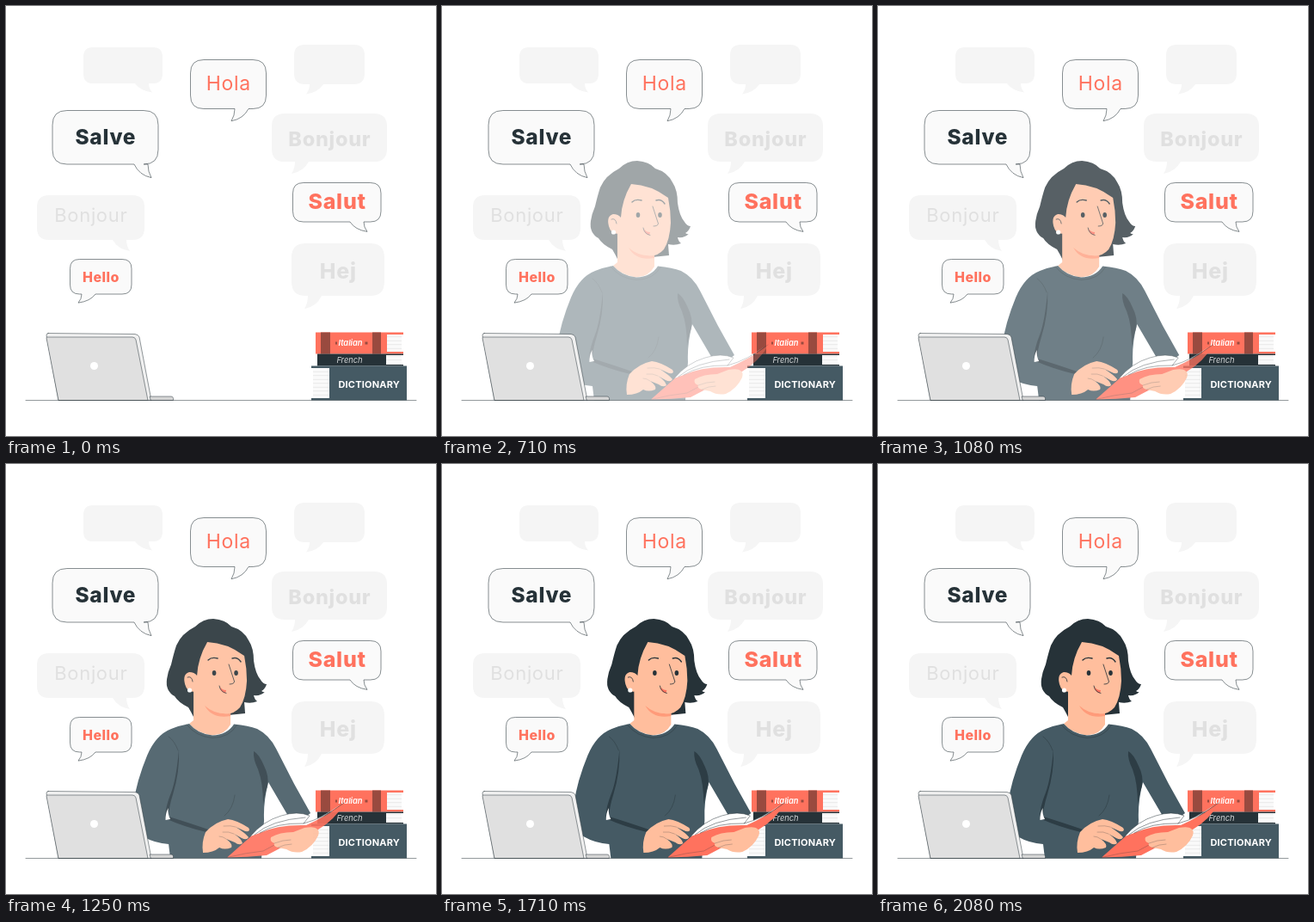
Animation of 500x500 px, one loop 2120 ms. Source, as an HTML page:

```html
<!DOCTYPE html>
<html lang="en">
<head>
<meta charset="utf-8">
<title>Languages</title>
<style>
html, body { margin: 0; width: 100%; height: 100%; overflow: hidden; background: #fff; }
svg { display: block; width: 100vw; height: 100vh; }
text { font-family: Inter, "Open Sans", sans-serif; text-anchor: middle; }
.ink { fill: none; stroke: #263238; stroke-width: .8; stroke-linecap: round; stroke-linejoin: round; }
.thin { stroke-width: .5; }
.bold { stroke-width: 1.4; }
.faint { opacity: .5; }
.skin { fill: #ffbe9d; }
.fold { fill: #2d3d45; }
.sweater { fill: #455a64; }
.hair { fill: #263238; }
.coral { fill: #ff725e; }
.band { fill: #994a3f; }
.pages { fill: url(#sheets); }
</style>
</head>
<body>
<svg viewBox="0 0 500 500">
  <defs>
    <pattern id="sheets" width="30" height="4.500" patternUnits="userSpaceOnUse">
      <path fill="#fafafa" d="M0 0H30V4.500H0Z"/>
      <path fill="#dedede" d="M0 2H30V2.600H0Z"/>
    </pattern>
  </defs>

  <g id="bubbles"></g>

  <g id="books">
    <path class="pages" d="M443 381H460V403H443ZM442 405H460V418H442ZM357 420H376V457H357Z"/>
    <path class="coral" d="M360 379.500H462V382H443V402H462V404.500H360Z"/>
    <path class="band" d="M366 379.500H377V404.500H366ZM426 379.500H436V404.500H426ZM383 390.500h2v3h-2zM417.500 390.500h3v3h-3z"/>
    <path class="hair" d="M362 404.500H462V406H442V417H462V418.500H362Z"/>
    <path class="sweater" d="M355 418.500H466V458.500H355V456H376V421H355Z"/>
    <g fill="#fff">
      <text x="400.500" y="395" font-size="9.300" font-weight="600" font-style="italic">Italian</text>
      <text x="399.500" y="415" font-size="9.300" font-style="italic" opacity=".8">French</text>
      <text x="422.200" y="444" font-size="11" font-weight="700" letter-spacing=".2">DICTIONARY</text>
    </g>
  </g>

  <g id="woman">
    <path class="hair" d="M223 189Q232 180 244 180Q258 181 265 189Q279 193 285 205Q291 214 291 229Q293 244 299 251Q302 256 306 256Q304 262 300 264Q303 266 304 265Q299 270 291 269Q292 274 295 276Q288 279 280 277L281 290L222 296Q218 288 215 283Q203 277 199 270Q188 264 190 250Q191 242 195 233Q198 220 201 211Q207 197 223 189Z"/>
    <path class="skin" d="M221 258H264V303Q256 317 240 315Q224 312 216 302L221 298Z"/>
    <path fill="#ff9b7a" d="M234 281Q246 292 264 290V293Q243 297 234 281Z"/>
    <path class="skin" d="M237 207Q260 208 280 223Q283 238 283 252Q282 272 275 283Q267 292 256 290Q238 287 230 274L224 264Q214 267 211 256Q208 244 216 242Q222 242 225 246Q226 226 237 207Z"/>
    <circle cx="216.500" cy="263" r="2.600" fill="#fff"/>
    <g class="hair">
      <ellipse cx="245" cy="243" rx="2.300" ry="2.900"/>
      <ellipse cx="270.500" cy="243" rx="2.300" ry="2.900"/>
    </g>
    <path class="ink bold" d="M238 228Q242 224 249 226M266 226Q272 224 276 230"/>
    <path class="ink" d="M214 248Q219 246 220 253M262 233L268.500 253Q268 256 263 256"/>
    <path class="coral" d="M252 259Q252 265 258 266.500L259 263Q254 263 252 259Z"/>
    <path class="ink" d="M251 258Q252 265 259 266.500"/>

    <path class="sweater" d="M216 302Q226 314 243 315.500Q260 315 268 302.500Q285 304 295 308Q309 315 317 331L338 372L357 406Q344 417 332 411L308 370Q302 393 303 414L300 458.500H194L192 442Q176 441 162 433Q148 420 151 395Q155 368 167 339Q177 315 195 308Q205 304 216 302Z"/>
    <path class="fold" d="M204 332Q205 358 197 384Q192 400 192 410Q212 416 238 425L236 428Q210 422 188 412Q188 399 195 382Q201 366 204 332Z"/>
    <path fill="#fff" d="M191.500 400Q188 407 188.500 414L194 413Q191 408 191.500 400Z"/>
    <path class="fold" d="M291 334Q297 337 303 351Q309 363 307 374Q303 388 302 396Q302 371 296 355Q290 343 291 334Z"/>
    <path class="ink faint" d="M213 303Q224 317 243 318.500Q263 318 271 304M192 317Q199 322 203 333M269 385Q267 401 257 409"/>

    <path class="coral" d="M260 457.500L290 431Q325 416 352 418Q375 411 397 394Q385 414 366 425Q342 436 306 455Q284 457 260 457.500Z"/>
    <path fill="#fff" d="M287 433Q302 415 323 409Q342 403 356 409L349 418Q368 413 392 396Q373 411 352 420Q319 419 298 429Z"/>
    <path class="ink thin" d="M287 433Q302 415 323 409Q342 403 356 409L349 418Q317 417 298 429M292 431Q311 414 351 411M349 418Q372 412 396 394"/>
    <path class="ink thin faint" d="M260 457.500Q282 452 302 450Q334 432 360 424"/>

    <path class="skin" d="M311 434Q321 428 337 428L350 423Q361 421 364 424Q368 426 366 432Q360 445 347 451Q337 453 329 448L319 446Q313 444 315 441Q309 439 311 434Z"/>
    <path class="skin" d="M235 428Q246 416 261 413Q271 414 285 423Q288 428 281 427L270 422Q281 429 285 434Q283 438 277 435L268 430Q277 436 278 441Q274 444 269 440L259 436Q267 442 265 446Q257 449 251 446Q244 452 232 452Q230 440 235 428Z"/>
    <path class="ink thin faint" d="M315 441Q325 437 334 437M319 446Q327 442 335 442M256 421Q264 420 270 422M255 428Q262 427 268 430M251 433Q255 433 259 436"/>
  </g>

  <g id="laptop" class="ink thin">
    <path fill="#f0f0f0" d="M49 380.500L150 381.500Q154 382 155 385L169 458.500H61L47 383Q47 381 49 380.500Z"/>
    <path fill="#e0e0e0" d="M48 385H147Q150 385 151 388L165 458.500H61L47 386Z"/>
    <path fill="#d5d5d5" d="M167.500 454H192Q195 454 194.500 458.500H168.500Z"/>
    <circle cx="102.500" cy="418.500" r="4.500" fill="#fff" stroke="none"/>
  </g>
  <path class="ink thin" d="M23 458.500H477"/>
</svg>

<script>
const CORAL = '#ff725e', DARK = '#263238', PALE = '#e0e0e0';

// Box, tail tip and lean (-1 left, 1 right); pale bubbles have no outline
const bubbles = [
  { box: [90, 48, 92, 42], tip: 170, lean: 1 },
  { box: [335, 45, 82, 46], tip: 349, lean: -1 },
  { box: [309, 125, 134, 56], tip: 332, lean: -1, text: 'Bonjour', base: 163, size: 23.5, weight: 800 },
  { box: [36, 220, 125, 52], tip: 144, lean: 1, text: 'Bonjour', base: 250.5, size: 22, weight: 400 },
  { box: [332, 276, 108, 61], tip: 347, lean: -1, text: 'Hej', base: 317, size: 25, weight: 800 },
  { box: [214.5, 62.5, 88, 57], tip: 262, lean: -1, text: 'Hola', base: 98, size: 23, weight: 400, color: CORAL },
  { box: [54, 121.5, 123, 62.5], tip: 169, lean: 1, text: 'Salve', base: 161, size: 24.5, weight: 800, color: DARK },
  { box: [333.5, 205.5, 102.5, 45.5], tip: 420, lean: 1, text: 'Salut', base: 236, size: 25, weight: 800, color: CORAL },
  { box: [74.5, 294.5, 71.5, 40.5], tip: 84, lean: -1, text: 'Hello', base: 321, size: 16, weight: 800, color: CORAL }
];

function add(parent, tag, attrs, text = '') {
  const el = document.createElementNS('http://www.w3.org/2000/svg', tag);
  for (const name in attrs) el.setAttribute(name, attrs[name]);
  el.textContent = text;
  parent.append(el);
}

function bubblePath([x, y, w, h], tip, lean) {
  const c = h * .27, r = x + w, b = y + h, drop = h * .25;
  const near = tip - lean * 4, far = tip - lean * 20;
  const nearSide = `${near} ${b + drop * .55}`;
  const farSide = `${far + lean * 6} ${b + drop * .82}`;
  const end = `${tip} ${b + drop}`;
  const tail = lean > 0
    ? `H${near}Q${nearSide} ${end}Q${farSide} ${far} ${b}`
    : `H${far}Q${farSide} ${end}Q${nearSide} ${near} ${b}`;
  return `M${x + c} ${y}H${r - c}Q${r} ${y} ${r} ${y + c}V${b - c}Q${r} ${b} ${r - c} ${b}` +
    `${tail}H${x + c}Q${x} ${b} ${x} ${b - c}V${y + c}Q${x} ${y} ${x + c} ${y}Z`;
}

const layer = document.getElementById('bubbles');
for (const { box, tip, lean, text, base, size, weight, color } of bubbles) {
  add(layer, 'path', {
    d: bubblePath(box, tip, lean), fill: color ? '#fafafa' : '#f5f5f5',
    stroke: color ? DARK : 'none', 'stroke-width': .55
  });
  if (!text) continue;
  const gap = size * .03;
  add(layer, 'text', {
    x: box[0] + (box[2] + gap) / 2, y: base, fill: color || PALE,
    'font-size': size, 'font-weight': weight, 'letter-spacing': gap
  }, text);
}

const LOOP = 2120, STEPS = 51, WAIT = 4, SLIDE = 46, SHIFT = 30;

// Gentle start, slight overshoot, then settles at 1
function ease(u) {
  return u + .35 * Math.sin(Math.PI * u ** 1.55);
}

const woman = document.getElementById('woman');
const start = performance.now();

function draw(now) {
  const time = Math.max(0, now - start) % LOOP;
  const step = Math.floor(time / LOOP * STEPS + .05);
  const p = ease(Math.min(1, Math.max(0, (step - WAIT) / SLIDE)));
  woman.setAttribute('opacity', Math.min(1, p));
  woman.setAttribute('transform', `translate(${SHIFT * (p - 1)} 0)`);
  requestAnimationFrame(draw);
}
draw(start);
</script>
</body>
</html>
```
